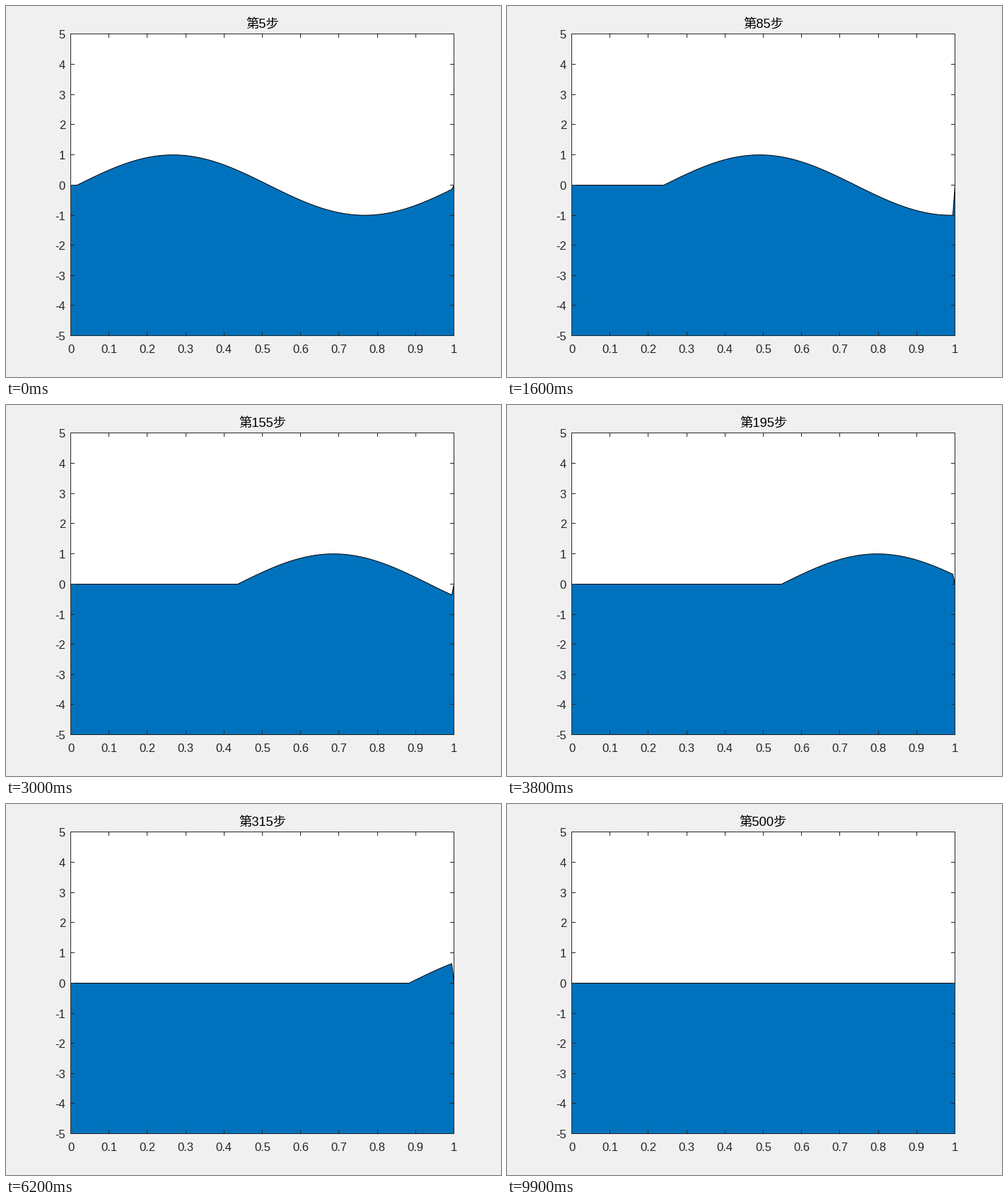
Animation, 700 px wide and 525 px high, one loop 10 s. Source, as a matplotlib script:

```python
import numpy as np
import matplotlib.pyplot as plt
from matplotlib.animation import FuncAnimation

W, H, DPI = 700, 525, 100
LEFT, RIGHT, TOP, BOTTOM = 91.5, 633.5, 39.5, 466.5
FRAMES, STRIDE, INTERVAL = 100, 5, 100
N = 180
INK = "#262626"
PX = 72 / DPI

plt.rcParams["font.family"] = ["Liberation Sans", "Noto Sans CJK JP"]

fig = plt.figure(figsize=(W / DPI, H / DPI), dpi=DPI, facecolor="#f0f0f0")
ax = fig.add_axes([0, 0, 1, 1])
ax.set(xlim=(0, W), ylim=(H, 0))
ax.axis("off")


def px(x):
    return LEFT + x * (RIGHT - LEFT)


def py(y):
    """Vertical pixel position; the zero level sits on a pixel centre."""
    return 253.5 - y * (253.5 - TOP if y > 0 else BOTTOM - 253.5) / 5


def line(x, y):
    ax.plot(x, y, color=INK, lw=PX, snap=False, zorder=3,
            solid_capstyle="projecting")


def tick(x, y, dx, dy):
    ax.plot([x, x + dx], [y, y + dy], color=INK, lw=PX, snap=False,
            zorder=3, solid_capstyle="butt")


def label(x, y, text, ha, size=16.67, color=INK):
    return ax.text(x, y, text, ha=ha, va="baseline", fontsize=size * PX,
                   color=color, zorder=4)


ax.fill([LEFT, RIGHT, RIGHT, LEFT], [TOP, TOP, BOTTOM, BOTTOM],
        color="white", lw=0, zorder=1)
water, = ax.fill([LEFT, RIGHT, RIGHT], [BOTTOM, BOTTOM, TOP], fc="#0072bd",
                 ec="black", lw=PX, snap=False, joinstyle="round", zorder=2)

line([LEFT, RIGHT, RIGHT, LEFT, LEFT], [TOP, TOP, BOTTOM, BOTTOM, TOP])
for i in range(11):
    x = np.floor(px(i / 10)) + 0.5
    y = np.floor(py(i - 5)) + 0.5
    tick(x, BOTTOM, 0, -5.5)
    tick(x, TOP, 0, 5.5)
    tick(LEFT, y, 5.5, 0)
    tick(RIGHT, y, -5.5, 0)
    label(px(i / 10), 491, f"{i / 10:g}", "center")
    label(84, y + 6.5, str(i - 5), "right")

title = label(362.5, 32, "", "center", 18.33, "black")

grid = np.linspace(0, 1, N)
cells = np.arange(N)


def wave(step):
    """Sine wave carried right by one cell every two steps."""
    moved = cells - (step // 2 + 1)
    u = np.where(moved > 0, np.sin(2 * np.pi * moved / (N - 1)), 0)
    u[-1] = 0
    return u


def update(i):
    step = STRIDE * (i + 1)
    top = [py(u) for u in wave(step)]
    xs = np.concatenate([[LEFT], px(grid), [RIGHT]])
    ys = np.concatenate([[BOTTOM], top, [BOTTOM]])
    water.set_xy(np.column_stack([xs, ys]))
    title.set_text(f"第{step}步")
    return water, title


anim = FuncAnimation(fig, update, frames=FRAMES, interval=INTERVAL,
                     repeat=True, repeat_delay=0)
plt.show()
```
